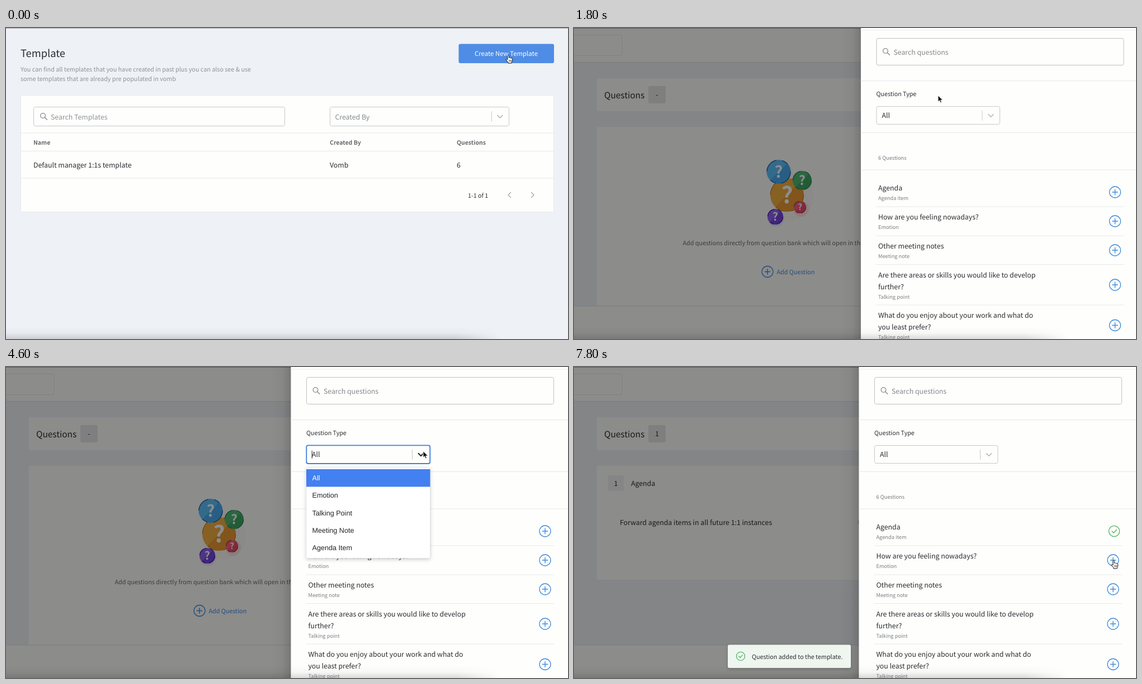
These frames come from a looping animation (1005x557 px, 8000 ms). An HTML page:

```html
<!DOCTYPE html>
<html lang="en">
<head>
<meta charset="utf-8">
<title>Template builder</title>
<style>
html, body { margin: 0; width: 100%; height: 100%; overflow: hidden; background: #eef1f5; }
svg { display: block; width: 1005px; height: 557px; }
text {
  font-family: "Noto Sans CJK SC", "Noto Sans CJK JP", "Noto Sans", sans-serif;
  text-rendering: geometricPrecision;
  white-space: pre;
}
.menu text { font-family: "Liberation Sans", Arial, sans-serif; }
</style>
</head>
<body>
<svg id="stage" viewBox="0 0 1005 557" xmlns="http://www.w3.org/2000/svg"></svg>
<script>
const LOOP = 8000, STEP = 200;
const INK = '#2b2d30', MUTED = '#8f9397', BLUE = '#3f8bdb', PAPER = '#fefefd', RULE = '#e6e8ea', EDGE = '#c6c8ca';
const BIG = 15.4, BODY = 12.3, NORMAL = 10.78, SMALL = 9.24;

// drawing helpers
const rect = (x, y, w, h, fill, r = 0, stroke = 'none', sw = 1) =>
  `<rect x="${x}" y="${y}" width="${w}" height="${h}" rx="${r}" fill="${fill}" stroke="${stroke}" stroke-width="${sw}"/>`;
const text = (x, y, str, size, fill = INK, extra = '') =>
  `<text x="${x}" y="${y}" font-size="${size}" fill="${fill}" ${extra}>${str}</text>`;
const mid = (x, y, str, size, fill) => text(x, y, str, size, fill, 'text-anchor="middle"');
const path = (d, stroke, w = 1, fill = 'none') =>
  `<path d="${d}" fill="${fill}" stroke="${stroke}" stroke-width="${w}" stroke-linecap="round" stroke-linejoin="round"/>`;
const rule = (x1, x2, y, c = RULE) => path(`M${x1} ${y}H${x2}`, c);
const circle = (x, y, r, fill, stroke = 'none', w = 1, extra = '') =>
  `<circle cx="${x}" cy="${y}" r="${r}" fill="${fill}" stroke="${stroke}" stroke-width="${w}" ${extra}/>`;
const group = (id, body, cls = '') => `<g id="${id}" class="${cls}">${body}</g>`;

const lens = (x, y) => circle(x, y, 4.3, 'none', '#85898c', 1.3) + path(`M${x + 3.3} ${y + 3.3}l4 4`, '#85898c', 1.4);
const chevron = (x, y, c = '#b4b6b8', w = 1.6) => path(`M${x - 4.5} ${y - 2.3}l4.5 4.6l4.5 -4.6`, c, w);
const plus = (x, y) => circle(x, y, 10, 'none', BLUE, 1.3) + path(`M${x - 4.7} ${y}h9.4M${x} ${y - 4.7}v9.4`, BLUE, 1.4);
const tick = (x, y, r) => circle(x, y, r, 'none', '#56b868', 1.4) +
  path(`M${x - r * .42} ${y}l${r * .32} ${r * .34}l${r * .55} ${-r * .62}`, '#56b868', 1.4);

const defs = `<defs>
  <linearGradient id="down" x1="0" y1="0" x2="0" y2="1">
    <stop offset="0" stop-opacity="0"/><stop offset=".5" stop-opacity=".025"/><stop offset="1" stop-opacity=".14"/></linearGradient>
  <linearGradient id="side"><stop offset="0" stop-opacity="0"/><stop offset=".6" stop-opacity=".035"/><stop offset="1" stop-opacity=".15"/></linearGradient>
  <linearGradient id="fade"><stop offset=".91" stop-color="#fff"/><stop offset="1" stop-color="#fff" stop-opacity="0"/></linearGradient>
  <mask id="taper"><rect y="520" width="885" height="40" fill="url(#fade)"/></mask>
  <pattern id="dots" width="3" height="3" patternUnits="userSpaceOnUse"><circle cx="1.5" cy="1.5" r=".5" fill="#e9c3a4"/></pattern>
  <filter id="soft" x="-20%" y="-20%" width="140%" height="150%"><feDropShadow dx="0" dy="2" stdDeviation="3" flood-opacity=".2"/></filter>
</defs>`;

function listPage() {
  const head = (x, s) => text(x, 208.5, s, 10.5, '#66696d', 'font-weight="600"');
  return rect(0, 0, 1005, 557, '#eef1f5') +
    text(26, 51.5, 'Template', 18.3) +
    text(26, 77.5, 'You can find all templates that you have created in past plus you can also see &amp; use', NORMAL, MUTED) +
    text(26, 94.5, 'some templates that are already pre populated in vomb', NORMAL, MUTED) +
    rect(809.5, 28.5, 170.5, 34.5, '#4f8ce5', 3) + mid(894.5, 50, 'Create New Template', 11.4, '#fff') +
    rect(26.5, 120.5, 953, 209, PAPER, 1, RULE) +
    rect(49.5, 141.5, 449, 34, PAPER, 3, EDGE) + lens(66, 157) + text(80, 163.7, 'Search Templates', BODY, MUTED) +
    rect(579.5, 141.5, 320, 34, PAPER, 3, EDGE) + text(588.5, 163.7, 'Created By', BODY, '#85888b') +
    path('M868.5 149.5V167.5', EDGE) + chevron(883.5, 158.7) +
    rule(27, 979, 188) + rule(27, 979, 220.5) + rule(27, 979, 269) +
    head(49, 'Name') + head(579, 'Created By') + head(806, 'Questions') +
    text(49, 250, 'Default manager 1:1s template', BODY) + text(579, 250, 'Vomb', BODY) + text(806, 250, '6', BODY) +
    text(826, 303.7, '1-1 of 1', 10.7) +
    path('M902.5 294.5l-4.5 4.5l4.5 4.5M939.5 294.5l4.5 4.5l-4.5 4.5', '#a4a6a8', 1.4);
}

function bubble(x, y, r, base, shade, rim, size) {
  const a = r * .7071;
  return circle(x, y, r, base) +
    `<path d="M${x + a} ${y - a}A${r} ${r} 0 0 1 ${x - a} ${y + a}Z" fill="${shade}"/>` +
    circle(x, y, r - .4, 'none', rim, 1.3, `stroke-dasharray="${r * 1.3} ${r * .5} ${r * .5} ${r * .8}"`) +
    text(x, y + size * .36, '?', size, '#fff', 'text-anchor="middle" font-weight="900"');
}

const art = `<ellipse cx="389" cy="302" rx="39" ry="42" fill="url(#dots)"/>` +
  circle(406, 324, 14, '#ee4f6e', 'none', 1, 'opacity=".12"') +
  circle(361, 341, 15, '#7b4ce8', 'none', 1, 'opacity=".12"') +
  bubble(381, 299, 30, '#f4b03f', '#eb9a31', '#c97a25', 41) +
  bubble(366, 257.5, 21.5, '#5cc0fb', '#48aaf0', '#1f4f9a', 29) +
  bubble(408, 273, 17, '#4fba74', '#3da763', '#23804a', 23) +
  bubble(404, 321, 11, '#f4607d', '#e64a69', '#b52c50', 15) +
  bubble(360, 338, 14, '#8d62f2', '#7545e0', '#3f1f9d', 20);

function editorPage() {
  const empty = rect(40.5, 177, 689.5, 340, PAPER, 3) + art +
    mid(384.7, 388.5, 'Add questions directly from question bank which will open in the right panel', NORMAL, '#6a6d70') +
    plus(346, 436.5) + text(362.5, 441, 'Add Question', NORMAL, BLUE);
  const filled = rect(40.5, 177, 689.5, 204, PAPER, 3) + rect(61, 194, 28, 28, '#f1f1f3', 3) +
    mid(75, 212.5, '1', BODY, INK) + text(102, 212.7, 'Agenda', BODY) +
    text(82, 282.7, 'Forward agenda items in all future 1:1 instances', BODY) +
    rect(507.5, 272, 24, 12, '#c8cacc', 6);
  return rect(0, 0, 1005, 557, '#eef1f5') + rect(0, 0, 1005, 61, PAPER) + rule(0, 1005, 61.5, '#dfe2e5') +
    rect(-20, 12.5, 106, 37, PAPER, 3, RULE) +
    rect(40.5, 90, 689.5, 59, PAPER, 3) + text(54, 125.5, 'Questions', BIG) +
    rect(133, 104, 31, 31, '#e7e7e8', 3) + `<text id="count" x="148.5" y="124" font-size="${BODY}" fill="${INK}" text-anchor="middle">-</text>` +
    rect(603, 104, 108, 31, '#f8fafc', 3) + plus(619.5, 119.5) + text(636.5, 124, 'Add Question', NORMAL, BLUE) +
    group('empty', empty) + group('filled', filled) +
    rect(0, 498, 1005, 59, PAPER) + rule(0, 1005, 498, '#dcdfe2') +
    rect(682.5, 512.5, 119.5, 32, PAPER, 3, BLUE, 1.2) + mid(742, 533, 'Back', NORMAL, BLUE) +
    rect(830, 513, 120, 31, '#e8e8e9', 3) + mid(890, 533, 'Save', NORMAL, '#6f7174') +
    `<rect id="rightShade" x="982" width="23" height="557" fill="url(#side)"/>`;
}

// title lines, type, first baseline, button centre, rule below
const questions = [
  [['Agenda'], 'Agenda item', 291, 294, 320],
  [['How are you feeling nowadays?'], 'Emotion', 343, 346, 372],
  [['Other meeting notes'], 'Meeting note', 394.7, 398, 423.5],
  [['Are there areas or skills you would like to develop', 'further?'], 'Talking point', 446.5, 460, 496],
  [['What do you enjoy about your work and what do', 'you least prefer?'], 'Talking point', 519, 532.5, 569]
];

function sidePanel() {
  const rows = questions.map(([lines, kind, y, cy, end], i) => {
    const last = y + (lines.length - 1) * 21;
    const icon = i ? plus(964, cy) : group('add', plus(964, cy)) + group('added', tick(966, cy, 9.6));
    return lines.map((s, n) => text(540.5, y + n * 21, s, BODY)).join('') +
      text(540.5, last + 17.2, kind, SMALL, '#7b7e81') + icon + rule(537, 980, end);
  }).join('');
  const options = ['All', 'Emotion', 'Talking Point', 'Meeting Note', 'Agenda Item'].map((s, i) =>
    text(547.5, 203.3 + i * 31.15, s, 12.6, i ? '#222426' : '#fff')).join('');
  const menu = rect(537, 180, 221.5, 162.5, '#fff', 3, '#d9dbdd', .6).replace('/>', ' filter="url(#soft)"/>') +
    rect(537, 183, 221.5, 31.5, '#4380f0') + options +
    rect(537.3, 140.3, 221, 32.7, 'none', 3, '#3f80dd', 1.8) +
    path('M547.2 150V163.5', '#222') + chevron(742, 157, '#26282a', 2);
  return `<rect x="472" width="37.5" height="557" fill="url(#side)"/>` +
    rect(509.5, 0, 510, 557, PAPER) + rule(509.5, 1010, 4, '#eaebec') +
    rect(537.5, 18.5, 442, 48, PAPER, 3, '#bfc1c3') + lens(553.5, 41) + text(568, 47.7, 'Search questions', BODY, '#85888b') +
    rule(509.5, 1010, 94.5) + text(537, 122, 'Question Type', 10.72) +
    rect(537.5, 140.5, 220.5, 32, PAPER, 3, EDGE) + text(547, 161.3, 'All', BODY) +
    path('M726.5 148.5V165.5', EDGE) + chevron(742, 157) +
    rule(509.5, 1010, 187.5) + text(540.5, 235.5, '6 Questions', SMALL, '#75787b') + rule(509.5, 1010, 254) +
    rows + group('menu', menu, 'menu');
}

const toast = rect(275, 497.5, 220, 41.5, '#eff6f0', 3).replace('/>', ' filter="url(#soft)"/>') +
  tick(298, 518, 7.6) + text(318, 522.7, 'Question added to the template.', NORMAL);

const arrow = path('M0 0V11.2L2.6 8.8L4.5 13L6.5 12.1L4.7 8.1H8.3Z', '#fff', .9, '#111');
const hand = path('M-1.2 1.2Q0 -.8 1.2 1.2V5.2Q2.7 4.2 3.5 5.6Q5 4.8 5.7 6.2Q7.4 5.7 7.6 7.4V10Q7.4 12 6.2 13.5V15H-.2V13.4L-4 8.6Q-3.8 6.6 -1.2 8.4Z', '#111', 1, '#fff') +
  path('M1.8 9.2V12M3.6 9.2V12M5.4 9.2V12', '#111', .7);

const stage = document.getElementById('stage');
stage.innerHTML = defs + group('list', listPage()) + group('editor', editorPage()) +
  `<path id="topLine" d="M0 .5H1005" stroke="#a3a5a8"/>` +
  group('dim', rect(0, 0, 1005, 557, '#000').replace('/>', ' opacity=".45"/>')) +
  group('panel', sidePanel()) + group('toast', toast) +
  `<rect y="535" width="890" height="22" fill="url(#down)" mask="url(#taper)"/>` +
  group('cursor', group('arrow', arrow) + group('hand', hand));

const $ = id => document.getElementById(id);
const show = (id, on) => $(id).setAttribute('visibility', on ? 'inherit' : 'hidden');

const pointer = [
  [0, 898, 48], [400, 898, 48], [1400, 651, 121], [2000, 651, 121], [3000, 740, 152], [4000, 746, 151],
  [4600, 746, 151], [5200, 799, 168], [5800, 858, 220], [6600, 956, 284], [6800, 964, 289],
  [7400, 964, 289], [7800, 965, 346], [8000, 965, 346]
];

function pointerAt(t) {
  const i = Math.max(1, pointer.findIndex(k => k[0] >= t));
  const [t0, x0, y0] = pointer[i - 1], [t1, x1, y1] = pointer[i];
  const p = (t - t0) / (t1 - t0), e = p * p * (3 - 2 * p);
  return [x0 + (x1 - x0) * e, y0 + (y1 - y0) * e];
}

function draw(now) {
  const t = Math.floor(now % LOOP / STEP) * STEP;
  const editing = t >= 600, open = t >= 1800, added = t >= 7400, pointing = t < 600 || t >= 6800;
  show('list', !editing);
  show('editor', editing);
  show('rightShade', editing && !open);
  show('dim', open);
  show('panel', open);
  $('panel').setAttribute('transform', `translate(${t === 1800 ? 3.5 : 0} 0)`);
  show('menu', open && t >= 3400 && t < 4800);
  show('empty', !added);
  show('filled', added);
  show('add', !added);
  show('added', added);
  show('toast', added);
  $('count').textContent = added ? '1' : '-';
  show('arrow', !pointing);
  show('hand', pointing);
  $('cursor').setAttribute('transform', `translate(${pointerAt(t).join(' ')})`);
}

const start = performance.now();
function tickFrame() {
  draw(performance.now() - start);
  requestAnimationFrame(tickFrame);
}
tickFrame();
</script>
</body>
</html>
```
